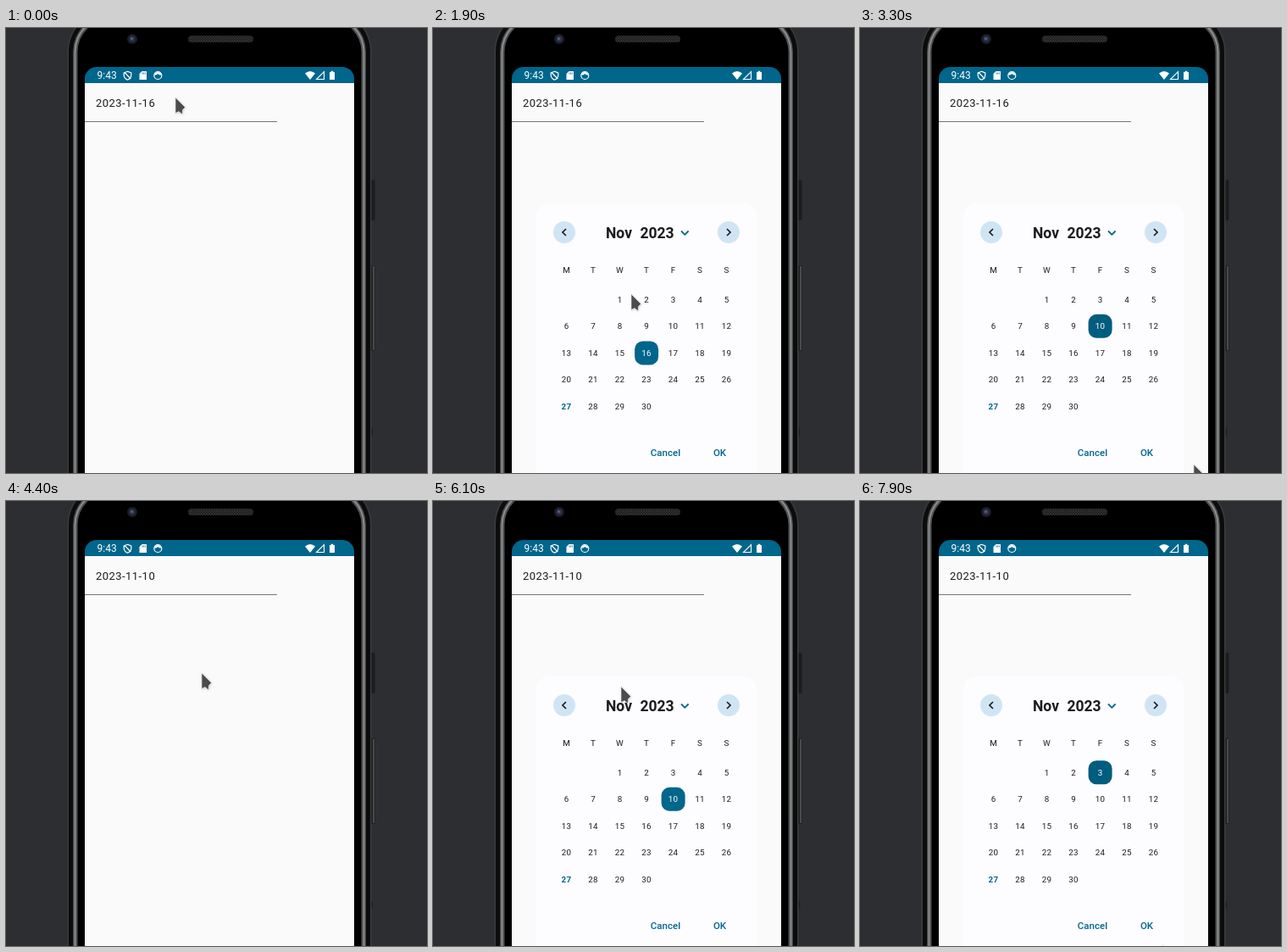
An HTML page for the animation above (8000 ms loop, 497 by 525 pixels).

```html
<!DOCTYPE html>
<html lang="en">
<head>
<meta charset="utf-8">
<title>Date picker</title>
<style>
  html, body { margin: 0; width: 100%; height: 100%; overflow: hidden; background: #2d2e32; }
  svg { display: block; width: 497px; height: 525px; }
  text { font-family: Roboto, sans-serif; fill: #1b1c1e; }
  .cell { font-size: 9.8px; letter-spacing: .35px; text-anchor: middle; }
  .head { font-size: 17.5px; font-weight: 700; }
  .action { font-size: 11.5px; font-weight: 500; fill: #00668b; text-anchor: middle; }
  .line { fill: none; }
</style>
</head>
<body>
<svg viewBox="0 0 497 525">
  <defs>
    <pattern id="mesh" width="3" height="3" patternUnits="userSpaceOnUse">
      <rect width="3" height="3" fill="#1c1c1c"/>
      <path d="M0 0L3 3M3 0L0 3" stroke="#3a3a3a" stroke-width=".7"/>
    </pattern>
    <filter id="soft" x="-50%" y="-50%" width="200%" height="200%">
      <feDropShadow dx=".4" dy=".6" stdDeviation=".9" flood-opacity=".22"/>
    </filter>
  </defs>

  <rect width="497" height="525" fill="#2d2e32"/>

  <!-- phone -->
  <rect x="430" y="179" width="5.5" height="48" rx="1.5" fill="#1c1d1f"/>
  <rect x="430" y="280" width="5.5" height="101" rx="1.5" fill="#1c1d1f"/>
  <path d="M434 281V380" stroke="#77797c"/>
  <rect x="430" y="472" width="3.5" height="9" fill="#222326"/>
  <g id="body"></g>
  <circle cx="149" cy="13" r="6" fill="#1c1d22"/>
  <circle cx="149" cy="13" r="3.4" fill="#2c344d"/>
  <circle cx="148.5" cy="12.5" r="1.5" fill="#52618c"/>
  <rect x="215" y="9" width="77" height="8" rx="4" fill="url(#mesh)"/>

  <!-- screen and status bar -->
  <rect x="93" y="65" width="318" height="460" fill="#fafafa"/>
  <path d="M93 65V60A14 14 0 0 1 107 46H397A14 14 0 0 1 411 60V65Z" fill="#00668b"/>
  <text x="107.6" y="60.2" font-size="12" style="fill:#fff">9:43</text>
  <g fill="#fff">
    <path d="M143.5 51.3L147.8 53V56Q147.5 59.5 143.5 61.2Q139.500 59.5 139.2 56V53ZM140 52.5L147.3 60"
          fill="none" stroke="#fff" stroke-width="1.2"/>
    <path d="M160.5 51H166V61H157.5V54Z"/>
    <path d="M161 52.5V54.5M162.7 52.5V54.5M164.4 52.5V54.5" stroke="#00668b" stroke-width=".8"/>
    <circle cx="179.3" cy="56" r="4.5" fill="none" stroke="#fff" stroke-width="1.2"/>
    <path d="M175 55.5A4.4 4.4 0 0 1 183.6 55.5Q181 56 179.3 54Q177.5 56 175 55.5Z"/>
    <path d="M353 53.5Q359 48.5 365 53.5L359 61Z"/>
    <path d="M375.5 51.5V60.5H366.5Z" fill="none" stroke="#fff" stroke-width="1.1"/>
    <path d="M382 52H383.7V50.8H386.3V52H388V61H382Z"/>
  </g>

  <!-- date field -->
  <rect id="press" x="93" y="65" width="227" height="45" fill="#ebecee"/>
  <rect x="93" y="110" width="227" height="1" fill="#6d7884"/>
  <text id="date" x="106" y="93.2" font-size="13" letter-spacing=".45"></text>

  <!-- calendar -->
  <g id="dialog">
    <rect x="122" y="206.5" width="260" height="340" rx="17" fill="#fdfcff"/>
    <circle cx="155" cy="241" r="13" fill="#d0e5f4"/>
    <circle cx="349" cy="241" r="13" fill="#d0e5f4"/>
    <path d="M157 237L153 241L157 245M347 237L351 241L347 245" class="line" stroke="#1b1c1e" stroke-width="1.7"/>
    <text class="head" x="204" y="248">Nov</text>
    <text class="head" x="244.5" y="248">2023</text>
    <path d="M293 239.5L297.3 243.8L301.6 239.5" class="line" stroke="#00668b" stroke-width="1.8"/>
    <rect id="mark" width="28" height="28" rx="9.5"/>
    <g id="cells"></g>
    <text class="action" x="274.5" y="505">Cancel</text>
    <text class="action" x="338.5" y="505">OK</text>
  </g>

  <path id="cursor" d="M0 0V18.5L4 16.5L8 20L8.5 14.5L11.5 11.5Z"
        fill="#4b4b4d" stroke="#eee" stroke-width=".6" filter="url(#soft)"/>
</svg>

<script>
const LOOP = 8000, STEP = 100;
const BLUE = "#00668b", INK = "#1b1c1e";
const $ = id => document.getElementById(id);
const set = (el, attrs) => {
  for (const k in attrs) el.setAttribute(k, attrs[k]);
  return el;
};
const add = (parent, tag, attrs) =>
  $(parent).appendChild(set(document.createElementNS("http://www.w3.org/2000/svg", tag), attrs));

// concentric shells from the outer edge to the black glass
const shells = { 0: "#3a3b3e", 1.5: "#0c0c0d", 6.5: "#4a4b4d", 8: "#8b8d8f", 10: "#4f5153", 12: "#000" };
for (const [key, fill] of Object.entries(shells).sort((a, b) => a[0] - b[0])) {
  const d = +key;
  add("body", "rect", { x: 72.5 + d, y: d - 22, width: 359 - 2 * d, height: 640, rx: 50 - d, fill });
}

const colX = i => 157.6 + 31.5 * i;
const rowY = i => 320.3 + 31.55 * i;
// the month starts on a Wednesday
const slot = day => [colX((day + 1) % 7), rowY(Math.floor((day + 1) / 7))];

function addCell(label, x, y) {
  const el = add("cells", "text", { class: "cell", x, y: y + 3.5 });
  el.textContent = label;
  return el;
}

[..."MTWTFSS"].forEach((c, i) => addCell(c, colX(i), 285.5));
const days = Array.from({ length: 30 }, (_, i) => addCell(i + 1, ...slot(i + 1)));
days[26].style.fontWeight = 700;

const ramp = (t, from, to) => Math.min(1, Math.max(0, (t - from) / (to - from)));
const pulse = (t, on, off) => ramp(t, on, on + 200) - ramp(t, off, off + 200);

// each move: start, end, and where the pointer comes to rest
const moves = [
  [0, 200, 196, 85],
  [1700, 1900, 234, 314],
  [1900, 2100, 264, 366],
  [2100, 2500, 275, 352],
  [2900, 3300, 394, 515],
  [3300, 3900, 341, 499],
  [4100, 4400, 231, 203],
  [4400, 4800, 228, 219],
  [5000, 5300, 222, 92],
  [5600, 5900, 222, 219],
  [6100, 6500, 296, 379],
  [6800, 7100, 283, 319],
  [7600, 7900, 357, 524]
];

function pointer(t) {
  let x = 200, y = 82;
  for (const [from, to, toX, toY] of moves) {
    const p = ramp(t, from, to);
    x += (toX - x) * p;
    y += (toY - y) * p;
  }
  return [x, y];
}

function draw(t) {
  set($("cursor"), { transform: `translate(${pointer(t)})` });
  set($("press"), { opacity: pulse(t, 700, 1400) + pulse(t, 5300, 5700) });
  set($("dialog"), { opacity: pulse(t, 1350, 4100) + ramp(t, 5900, 6100) });
  $("date").textContent = t < 4300 ? "2023-11-16" : "2023-11-10";

  const picked = t < 2900 ? 16 : t < 7600 ? 10 : 3;
  const fresh = (t >= 2900 && t < 4300) || t >= 7600;
  const [x, y] = slot(picked);
  set($("mark"), { x: x - 14, y: y - 14, fill: fresh ? "#005d7e" : BLUE });
  days.forEach((el, i) => {
    el.style.fill = i + 1 === picked ? "#fff" : i === 26 ? BLUE : INK;
  });
}

const start = performance.now();
function tick() {
  const t = (performance.now() - start) % LOOP;
  draw(Math.floor(t / STEP) * STEP);
  requestAnimationFrame(tick);
}
tick();
</script>
</body>
</html>
```
